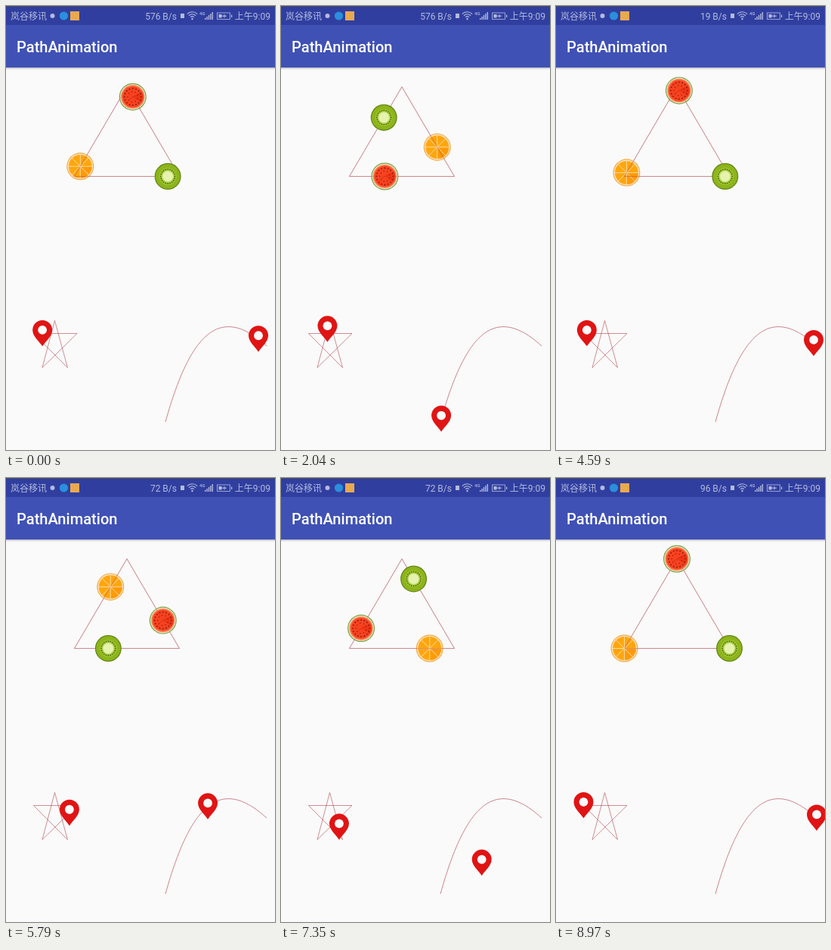
Recreate the animation shown at these times as an HTML page with a canvas. Size 356 px wide and 585 px high, loop 9.07 s.

```html
<!DOCTYPE html>
<html lang="zh">
<head>
<meta charset="utf-8">
<title>PathAnimation</title>
<style>
  html, body { margin: 0; width: 100%; height: 100%; overflow: hidden; background: #fafafa; }
  canvas { position: absolute; left: 0; top: 0; width: 356px; height: 585px; }
  .bar { position: absolute; top: 6px; font: 12px/16px Roboto, "Noto Sans CJK SC", "Noto Sans CJK", sans-serif;
    color: #b4badf; white-space: nowrap; }
  #title { position: absolute; left: 14px; top: 42px; margin: 0; color: #fff;
    font: 500 20.1px/24px Roboto, sans-serif; white-space: nowrap; }
</style>
</head>
<body>
<canvas id="stage"></canvas>
<span class="bar" style="left:6px">岚谷移讯</span>
<span class="bar" id="rate" style="right:calc(100% - 226px)"></span>
<span class="bar" style="right:calc(100% - 350px)">上午9:09</span>
<span class="bar" style="left:256px;top:6px;font-size:6px;line-height:7px;font-weight:500">4G</span>
<h1 id="title">PathAnimation</h1>
<script>
const W = 356, H = 585, LOOP = 9070, TAU = Math.PI * 2;
const LINE = '#b0434f';
const canvas = document.getElementById('stage');
const rate = document.getElementById('rate');
const dpr = window.devicePixelRatio || 1;
canvas.width = W * dpr;
canvas.height = H * dpr;
const ctx = canvas.getContext('2d');

// time in ms, cycle phase, redraws until the next key
const keys = [
  [0, 0.1235, 8], [1170, 0.3543, 13], [2970, 0.7457, 12], [4590, 1.0749, 9],
  [5790, 1.3169, 12], [7350, 1.6613, 12], [8970, 2, 1], [LOOP, 2, 1]
];
const rates = [[0, 576], [2790, 19], [5790, 72], [8790, 96]];

const A = [160, 106.5], B = [229.5, 224.5], C = [90.5, 224.5];
const star = makePath([[36.5, 431.5], [94, 431.5], [48, 476.5], [64.5, 414.5], [81.5, 476.5]]);
const arc = makePath(cubic([345, 448], [283.5, 392], [244, 430], [211, 548], 60));
const fruits = [
  { path: makePath([C, A, B]), draw: orange },
  { path: makePath([A, B, C]), draw: melon },
  { path: makePath([B, C, A]), draw: kiwi }
];

function cubic(a, b, c, d, n) {
  return Array.from({ length: n + 1 }, (_, i) => {
    const t = i / n, u = 1 - t;
    return [0, 1].map(k =>
      u * u * u * a[k] + 3 * t * u * u * b[k] + 3 * t * t * u * c[k] + t * t * t * d[k]);
  });
}

// closed polyline with the length of each side
function makePath(pts) {
  const sides = pts.map((p, i) => {
    const q = pts[(i + 1) % pts.length];
    return Math.hypot(q[0] - p[0], q[1] - p[1]);
  });
  return { pts, sides, total: sides.reduce((a, b) => a + b) };
}

function pointAt({ pts, sides, total }, s) {
  let d = s * total, i = 0;
  while (i < sides.length - 1 && d > sides[i]) d -= sides[i++];
  const p = pts[i], q = pts[(i + 1) % pts.length], u = d / sides[i];
  return [p[0] + (q[0] - p[0]) * u, p[1] + (q[1] - p[1]) * u];
}

function phaseAt(t) {
  let i = 0;
  while (i < keys.length - 2 && t >= keys[i + 1][0]) i++;
  const [t0, p0, n] = keys[i], [t1, p1] = keys[i + 1];
  const step = Math.floor((t - t0) / (t1 - t0) * n + 0.001) / n;
  return p0 + (p1 - p0) * step;
}

function disc(x, y, r, color) {
  ctx.fillStyle = color;
  ctx.beginPath();
  ctx.arc(x, y, r, 0, TAU);
  ctx.fill();
}

function wedge(r, from, to, color) {
  ctx.fillStyle = color;
  ctx.beginPath();
  ctx.moveTo(0, 0);
  ctx.arc(0, 0, r, from, to);
  ctx.fill();
}

function ring(n, r, size, color, shift = 0) {
  for (let i = 0; i < n; i++) {
    const a = (i + shift) / n * TAU;
    disc(Math.cos(a) * r, Math.sin(a) * r, size, color);
  }
}

function strokePath(pts, closed, width, color = LINE) {
  ctx.beginPath();
  pts.forEach(p => ctx.lineTo(...p));
  if (closed) ctx.closePath();
  ctx.strokeStyle = color;
  ctx.lineWidth = width;
  ctx.stroke();
}

function orange() {
  disc(0, 0, 18, '#f5aa48');
  disc(0, 0, 16.8, '#fce4c0');
  disc(0, 0, 15.4, '#ffa60f');
  wedge(15.4, 0, Math.PI / 2, '#ff9a08');
  for (let i = 0; i < 4; i++) {
    const a = i * Math.PI / 4, x = Math.cos(a) * 15.6, y = Math.sin(a) * 15.6;
    strokePath([[-x, -y], [x, y]], false, 0.9, '#fde3b0');
  }
}

function melon() {
  disc(0, 0, 18, '#7aa044');
  disc(0, 0, 16.8, '#ecebc4');
  disc(0, 0, 15.6, '#ff7d55');
  disc(0, 0, 13.8, '#f8421f');
  wedge(13.8, -0.5, 0.6, '#ee3514');
  ring(16, 11, 0.9, '#7a1a10');
  ring(9, 6.8, 0.75, '#8a1e10', 0.5);
  strokePath([[-5, 4], [0, 0], [8, -4]], false, 0.8, '#d92a14');
}

function kiwi() {
  disc(0, 0, 17.5, '#64881a');
  disc(0, 0, 16.2, '#8db41a');
  disc(0, 0, 11.5, '#9cc32c');
  ring(20, 9.4, 0.8, '#3c570f');
  disc(0, 0, 7.8, '#c9de80');
  disc(0, 0, 6.6, '#e6f3ae');
}

function pin() {
  ctx.fillStyle = '#e01414';
  ctx.beginPath();
  ctx.moveTo(0, 17.2);
  ctx.bezierCurveTo(-4, 11, -13, 4, -13, -4.2);
  ctx.arc(0, -4.2, 13, Math.PI, 0);
  ctx.bezierCurveTo(13, 4, 4, 11, 0, 17.2);
  ctx.fill();
  disc(0, -4.2, 5.9, '#fafafa');
}

function place(draw, [x, y]) {
  ctx.save();
  ctx.translate(x, y);
  draw();
  ctx.restore();
}

function box(x, y, w, h, color) {
  ctx.fillStyle = color;
  ctx.fillRect(x, y, w, h);
}

function statusIcons() {
  const pale = '#b4badf';
  disc(61.5, 13, 3, pale);
  disc(76.5, 13, 5.6, '#2a8fdc');
  box(85, 7, 12, 12, '#e9a94f');
  box(231, 10, 5, 6, pale);

  ctx.strokeStyle = pale;
  ctx.lineWidth = 1.1;
  for (const r of [3.2, 6.2, 9.2]) {
    ctx.beginPath();
    ctx.arc(246.5, 17, r, -Math.PI * 0.76, -Math.PI * 0.24);
    ctx.stroke();
  }
  disc(246.5, 17, 1.2, pale);

  for (let i = 0; i < 5; i++) box(263 + i * 2.4, 16 - i * 2, 1.4, 2 + i * 2, pale);

  ctx.lineWidth = 0.8;
  ctx.strokeRect(279.5, 9, 17, 8.5);
  box(298, 11.5, 1.2, 3.5, pale);
  box(281.5, 11, 4, 4.5, pale);
  strokePath([[285, 13.2], [292, 13.2]], false, 1.1, pale);
  strokePath([[289, 11], [289, 15.5]], false, 1.1, pale);
}

function chrome() {
  box(0, 0, W, H, '#fafafa');
  const shade = ctx.createLinearGradient(0, 81, 0, 84);
  shade.addColorStop(0, 'rgba(0,0,0,.24)');
  shade.addColorStop(1, 'rgba(0,0,0,0)');
  box(0, 81, W, 3, shade);
  box(0, 25, W, 56, '#3f51b5');
  box(0, 0, W, 25, '#303f9f');
  box(0, 0, W, 1, '#4b4b50');
  statusIcons();
}

function render(t) {
  const s = (1 - Math.cos(phaseAt(t) % 1 * Math.PI)) / 2;
  ctx.setTransform(dpr, 0, 0, dpr, 0, 0);
  chrome();
  // each layer strokes its own outline, so later ones cross earlier fruit
  for (const { path, draw } of fruits) {
    strokePath(path.pts, true, 0.28);
    place(draw, pointAt(path, s));
  }
  strokePath(star.pts, true, 0.6);
  strokePath(arc.pts, false, 0.65);
  for (const path of [star, arc]) {
    const [x, y] = pointAt(path, s);
    place(pin, [x, y - 0.4]);
  }

  const label = rates.filter(r => t >= r[0]).pop()[1] + ' B/s';
  if (rate.textContent !== label) rate.textContent = label;
}

const start = performance.now();
function tick() {
  render((performance.now() - start) % LOOP);
  requestAnimationFrame(tick);
}
tick();
</script>
</body>
</html>
```
